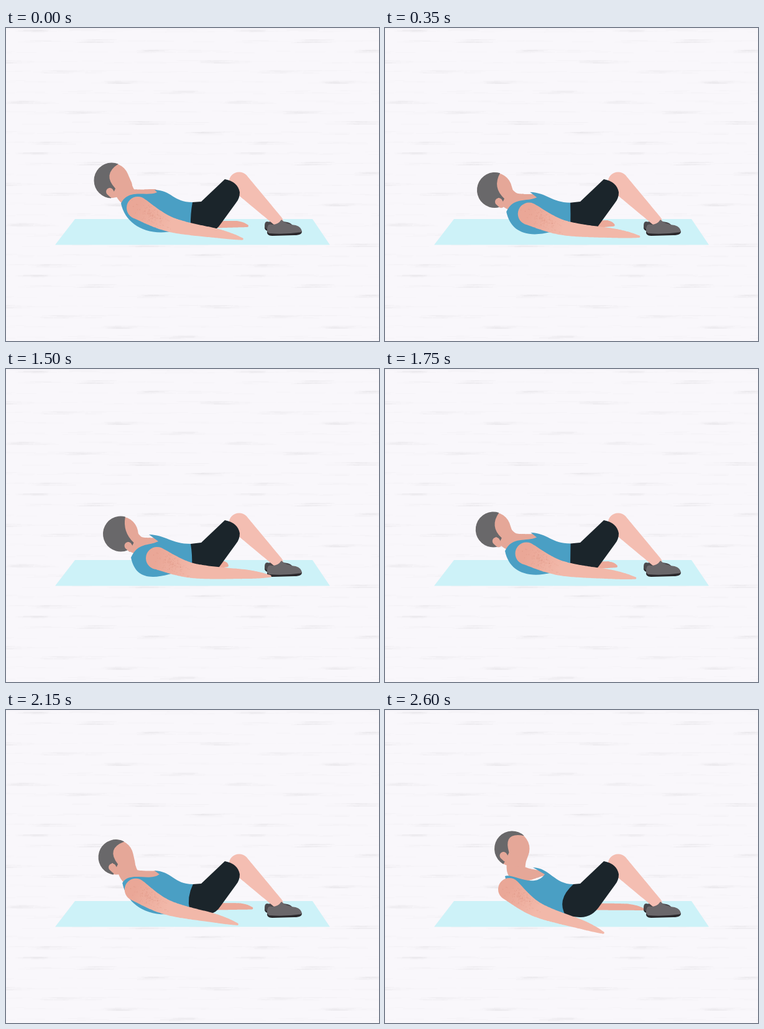
Write an HTML page with a canvas that moves like this. It is 600x503 px and loops after 3400 ms.

```html
<!DOCTYPE html>
<html lang="en">
<head>
<meta charset="utf-8">
<title>Heel touch exercise</title>
<style>
html, body { margin: 0; width: 100%; height: 100%; overflow: hidden; background: #f9f7fb; }
canvas { display: block; }
</style>
</head>
<body>
<canvas id="stage" width="600" height="503"></canvas>
<script>
const W = 600, H = 503, LOOP = 3400, STEP = 50, RAD = Math.PI / 180;
const SKIN = '#e5a798', ARM = '#f2b8a9', LEG = '#f4beb2';
const BLUE = '#4a9fc4', HAIR = '#69686a', DARK = '#1b252b';
const ctx = document.getElementById('stage').getContext('2d');

const mix = (a, b, p) => a + (b - a) * p;
const mixAll = (a, b, p) => a.map((v, i) => mix(v, b[i], p));
const add = ([x, y], dx, dy) => [x + dx, y + dy];

function random(seed) {
  return () => (seed = (seed * 16807) % 2147483647) / 2147483647;
}

// Each joint: reaching for the heel, resting, raised.
const joints = {
  head:     [[184.5, 265], [170, 245], [204.5, 223]],
  jaw:      [[13, 5], [17, 9], [8, 13]],            // from the head
  ear:      [[13, 20], [-2, 19], [-13, 12]],        // from the head
  hair:     [[-75, 12], [-68, 24], [-47, 30]],      // angle of the tip, depth of the hairline
  chest:    [[213, 283], [200, 272], [214, 262]],
  strap:    [[201, 303], [185, 282], [193, 267]],
  neckline: [[245, 277], [243, 264], [257, 264]],
  collar:   [[230, 266], [239, 260], [238, 253]],
  waist:    [[297, 281], [300, 280], [303, 280]],
  seat:     [[299, 317], [297, 318], [291, 331]],
  bend:     [[25, -2], [25, 2], [5, 22]],           // rise of the strap, bulge of the hip
  shoulder: [[243, 304], [212, 289], [200, 288]],
  elbow:    [[300, 324], [265, 316], [245, 321]],
  wrist:    [[390, 330], [345, 331], [320, 346]],
  hand:     [[425, 333], [380, 339], [351, 358]],
  farHand:  [[356, 316], [388, 318], [415, 320]]
};

// s runs from -1 (reaching) through 0 (resting) to 1 (raised).
function poseAt(t) {
  if (t < 550) return -t / 550;
  if (t < 1500) return -1;
  if (t < 2000) return (t - 2000) / 500;
  return Math.min(1, (t - 2000) / 550);
}

function jointsAt(s) {
  const k = s < 0 ? 0 : 1, p = s < 0 ? s + 1 : s, pose = {};
  for (const name in joints) pose[name] = mixAll(joints[name][k], joints[name][k + 1], p);
  // The head swings on an arc around the hips.
  const arc = 12 * p * (1 - p);
  pose.head = add(pose.head, -arc, -Math.sign(s) * arc);
  pose.jaw = add(pose.head, ...pose.jaw);
  pose.ear = add(pose.head, ...pose.ear);
  return pose;
}

function shape(color, trace) {
  const path = new Path2D();
  trace(path);
  ctx.fillStyle = color;
  ctx.fill(path);
  return path;
}

// Smooth interpolation through a row of nodes, u from 0 to 1.
function along(nodes, u) {
  const last = nodes.length - 1, i = Math.min(last - 1, Math.floor(u * last)), f = u * last - i;
  const at = k => nodes[Math.max(0, Math.min(last, k))];
  const [a, b, c, d] = [at(i - 1), at(i), at(i + 1), at(i + 2)];
  return b.map((v, j) => v + f / 2 * (c[j] - a[j] +
    f * (2 * a[j] - 5 * v + 4 * c[j] - d[j] + f * (3 * (v - c[j]) + d[j] - a[j]))));
}

// Tapered tube: nodes are [x, y, radius].
function limb(color, ...nodes) {
  return shape(color, p => {
    for (let i = 0; i <= 120; i++) {
      const [x, y, r] = along(nodes, i / 120);
      p.moveTo(x + r, y);
      p.arc(x, y, r, 0, 7);
    }
  });
}

function drawLeg() {
  limb(LEG, [375, 248, 16.5], [437, 310, 8.5]);
}

function drawShoe(x, y, size, color) {
  ctx.save();
  ctx.translate(x, y);
  ctx.scale(size, size);
  shape('#2a282b', p => {
    p.moveTo(0, 19);
    p.lineTo(56, 19);
    p.quadraticCurveTo(57, 26, 44, 26);
    p.lineTo(8, 27);
    p.quadraticCurveTo(-1, 27, 0, 19);
  });
  shape(color, p => {
    p.moveTo(0, 20);
    p.quadraticCurveTo(-1, 6, 8, 9);
    p.quadraticCurveTo(18, 9, 23, 1);
    p.quadraticCurveTo(31, 9, 46, 10);
    p.quadraticCurveTo(56, 13, 56, 21);
    p.quadraticCurveTo(28, 25, 3, 23);
  });
  ctx.restore();
}

function drawShirt({ strap, neckline, collar, waist, seat, bend: [rise] }) {
  shape(BLUE, p => {
    p.moveTo(...strap);
    p.bezierCurveTo(...add(strap, 12, -rise), ...add(neckline, -17, 28 - .8 * rise), ...neckline);
    p.lineTo(...collar);
    p.bezierCurveTo(...add(collar, 28, 1), ...add(waist, -31, 0), ...waist);
    p.lineTo(...add(waist, 8, 8));
    p.lineTo(...seat);
    p.bezierCurveTo(...add(seat, -60, rise), ...add(strap, 8, 38), ...strap);
  });
}

function drawShorts({ waist, seat, bend: [, hip] }) {
  const middle = mixAll(waist, seat, .5);
  shape(DARK, p => {
    p.moveTo(...waist);
    p.lineTo(314, 279);
    p.lineTo(352, 243);
    p.quadraticCurveTo(373, 247, 376, 264);
    p.quadraticCurveTo(376, 274, 370, 281);
    p.lineTo(346, 314);
    p.quadraticCurveTo(333, 334, ...add(seat, 22, 2));
    p.lineTo(...seat);
    p.quadraticCurveTo(...add(middle, -hip, 0), ...waist);
  });
}

function drawArm({ shoulder, elbow, wrist, hand }) {
  const tone = ctx.createLinearGradient(...shoulder, ...elbow);
  tone.addColorStop(0, '#eaa797');
  tone.addColorStop(1, ARM);
  const path = limb(tone, [...shoulder, 18], [...elbow, 12], [...wrist, 7], [...hand, 1.8]);

  const [x, y] = mixAll(shoulder, elbow, .4), rnd = random(77);
  ctx.save();
  ctx.clip(path);
  ctx.fillStyle = 'rgba(212,135,116,.3)';
  for (let i = 0; i < 140; i++) {
    const dx = (rnd() + rnd() + rnd() - 1.5) * 26, dy = (rnd() + rnd() - 1) * 15;
    ctx.fillRect(x + dx, y + dy + dx * .45, 1, 1);
  }
  ctx.restore();
}

function drawHead({ head, jaw, ear, hair: [angle, depth] }) {
  const r = 28.5, a = angle * RAD;
  const tip = add(head, r * Math.cos(a), r * Math.sin(a));
  const side = add(ear, 8, -6), nape = add(ear, 1, 9);
  const dx = tip[0] - side[0], dy = tip[1] - side[1], len = Math.hypot(dx, dy);
  const inner = add(mixAll(tip, side, .5), dy / len * depth, -dx / len * depth);

  limb(SKIN, [...head, r - .5], [...jaw, 16]);
  shape(HAIR, p => {
    p.arc(...head, r, a, Math.atan2(nape[1] - head[1], nape[0] - head[0]), true);
    p.lineTo(...nape);
    p.lineTo(...side);
    p.quadraticCurveTo(...inner, ...tip);
  });
  limb(SKIN, [...add(ear, -1, -1), 6], [...add(ear, 3, 4), 5]);
}

// Paper with rows of faint brush marks that repeat every 350 px, and the mat.
function makePaper() {
  const sheet = document.createElement('canvas');
  sheet.width = W;
  sheet.height = H;
  const g = sheet.getContext('2d');
  g.fillStyle = '#f9f7fb';
  g.fillRect(0, 0, W, H);
  g.fillStyle = 'rgba(110,106,118,.014)';
  for (let row = 0; row < 31; row++) {
    const rnd = random(911 + (row % 12) * 7919), y = 4 + row * 16.4;
    for (let k = 0; k < 30; k++) {
      const x = k % 2 ? rnd() * 350 : (row % 12 * 97 + 15) % 350 + rnd() * 30;
      const len = 20 + rnd() * 35, dy = (rnd() - .5) * 5;
      for (let left = -350; left < W; left += 350) {
        g.fillRect(left + x, y + dy, len, 1 + rnd());
      }
    }
  }
  g.fillStyle = 'rgba(110,106,118,.04)';
  g.fillRect(0, 0, W, 1.5);

  g.fillStyle = '#cdf2f8';
  g.beginPath();
  g.moveTo(111, 307);
  g.lineTo(493, 307);
  g.lineTo(521, 348.5);
  g.lineTo(79, 348.5);
  g.fill();
  return sheet;
}

const paper = makePaper();

function draw(now) {
  const t = Math.floor((now % LOOP) / STEP) * STEP, pose = jointsAt(poseAt(t));
  const { jaw, chest, neckline, farHand } = pose, farStart = [335, 316];
  ctx.drawImage(paper, 0, 0);
  limb('#eca999', [...farStart, 5.5], [...add(mixAll(farStart, farHand, .7), 0, -2), 5], [...farHand, 2]);
  drawShoe(416, 304, .82, '#4b494c');
  drawLeg();
  drawShoe(420, 307, 1, '#6a676a');
  limb(SKIN, [...jaw, 15], [...chest, 14], [...add(neckline, -4, -1), 4]);
  drawShirt(pose);
  drawShorts(pose);
  drawArm(pose);
  drawHead(pose);
}

const start = performance.now();
function tick() {
  draw(performance.now() - start);
  requestAnimationFrame(tick);
}
tick();
</script>
</body>
</html>
```
